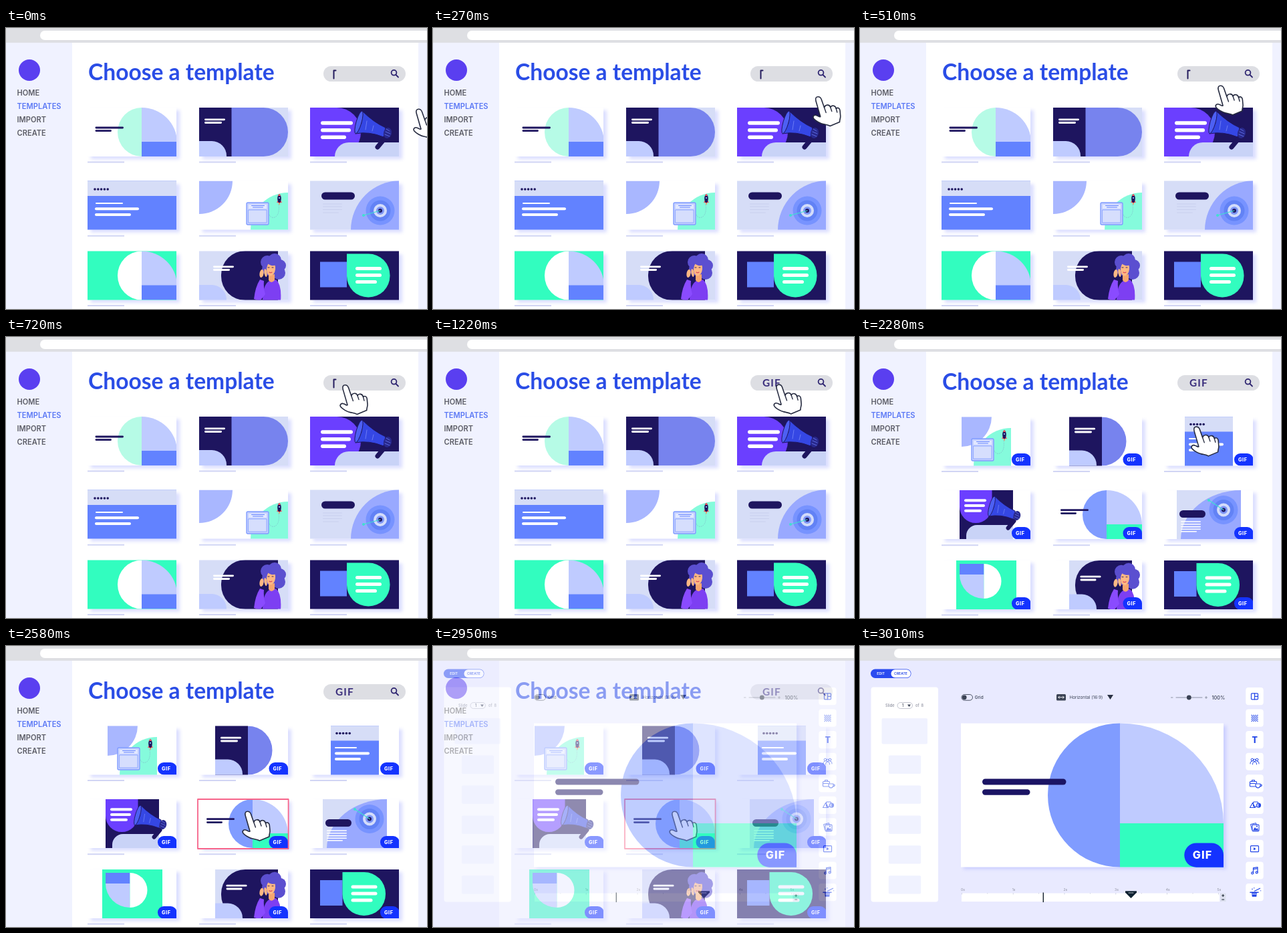
Animation of 630 by 420 pixels, one loop 4.84 s. Source, as an HTML page with a canvas:

```html
<!DOCTYPE html>
<html lang="en">
<head>
<meta charset="utf-8">
<title>Choose a template</title>
<style>
html, body { margin: 0; width: 100%; height: 100%; overflow: hidden; background: #fff; }
canvas { display: block; }
</style>
</head>
<body>
<canvas id="stage" width="630" height="420"></canvas>
<script>
const W = 630, H = 420, LOOP = 4840, STEP = 30;
const NAVY = '#1e155f', BLUE = '#6282ff', LILAC = '#bfcbff', PALE = '#d6ddf7',
  MINT = '#32fdbf', PERI = '#7783ee', PURPLE = '#6b3fff', SKY = '#809cff',
  INK = '#2346e8', WHITE = '#fff', PANEL = '#f0f2ff';
const screen = document.getElementById('stage').getContext('2d');
let g = screen;

// ---- drawing helpers ----
function rect(c, x, y, w, h) { g.fillStyle = c; g.fillRect(x, y, w, h); }

function round(c, x, y, w, h, r) {
  g.fillStyle = c; g.beginPath(); g.roundRect(x, y, w, h, r); g.fill();
}

function frame(c, lw, x, y, w, h, r = 0) {
  g.strokeStyle = c; g.lineWidth = lw;
  g.beginPath(); g.roundRect(x, y, w, h, r); g.stroke();
}

function oval(c, x, y, rx, ry = rx, rot = 0) {
  g.fillStyle = c; g.beginPath(); g.ellipse(x, y, rx, ry, rot, 0, 7); g.fill();
}

// Sector starting at quadrant q (0 = lower right, clockwise), n quadrants wide
function pie(c, x, y, rx, ry, q, n = 1) {
  g.fillStyle = c; g.beginPath(); g.moveTo(x, y);
  g.ellipse(x, y, rx, ry, 0, q * Math.PI / 2, (q + n) * Math.PI / 2); g.fill();
}

function bar(c, x1, x2, y, w) { round(c, x1, y - w / 2, x2 - x1, w, w / 2); }

function fill(c, d) { g.fillStyle = c; g.fill(new Path2D(d)); }

function stroke(c, lw, d) {
  g.strokeStyle = c; g.lineWidth = lw; g.lineCap = g.lineJoin = 'round';
  g.stroke(new Path2D(d));
}

function text(s, x, y, font, c, gap = 0) {
  g.font = font; g.fillStyle = c; g.letterSpacing = gap + 'px'; g.fillText(s, x, y);
}

const inter = (weight, size) => `${weight} ${size}px Inter, sans-serif`;
const lato = size => `bold ${size}px Lato, sans-serif`;

function at(x, y, s, paint) {
  g.save(); g.translate(x, y); g.scale(s, s); paint(); g.restore();
}

function shadow(dx, dy, blur) {
  g.shadowColor = 'rgba(90,105,255,.22)';
  g.shadowOffsetX = dx; g.shadowOffsetY = dy; g.shadowBlur = blur;
}

function bake(paint) {
  const c = document.createElement('canvas');
  c.width = W; c.height = H;
  g = c.getContext('2d');
  paint();
  g = screen;
  return c;
}

// ---- small illustrations ----
function megaphone(x, y, s) {
  at(x, y, s, () => {
    stroke(NAVY, 7, 'M38 25L28 37');
    fill('#3547e4', 'M5-17Q22 0 40 8L37 22Q15 13-5 17Z');
    stroke(NAVY, 1, 'M5-17Q22 0 40 8L37 22Q15 13-5 17');
    oval('#28288c', 43, 16, 6, 8, .25);
    stroke('#6b7bf5', .8, 'M41 10L46 13M40 14L47 17M39 18L46 21');
    oval('#4d60f3', 0, 0, 4, 17.5, .28);
    g.strokeStyle = NAVY; g.lineWidth = 1; g.stroke();
    stroke('#6b7bf5', 1, 'M12-2L10 11M22 5L20 13');
  });
}

function appWindow(x, y) {
  round('#c5d0ff', x, y, 33, 33, 2);
  frame(SKY, 1.4, x, y, 33, 33, 2);
  rect('#e2e8ff', x + 3, y + 3, 27, 6);
  bar(BLUE, x + 7, x + 27, y + 4.5, 1);
  bar(BLUE, x + 9, x + 25, y + 7, 1);
  rect('#d6defd', x + 3, y + 11, 27, 19);
  frame(SKY, .8, x + 3, y + 11, 27, 19);
}

function rocket(x, y) {
  g.setLineDash([1, 2]);
  stroke('#7fb8c8', .7, `M${x - 1} ${y + 9}C${x + 2} ${y + 30} ${x - 12} ${y + 32} ${x - 15} ${y + 24}`);
  g.setLineDash([]);
  fill('#f2545b', `M${x - 4} ${y + 6}l4-7l4 7z`);
  oval(NAVY, x, y, 2.8, 6.5);
  fill('#f2545b', `M${x - 2} ${y - 4}Q${x} ${y - 10} ${x + 2} ${y - 4}Z`);
  oval('#9fd8ff', x, y - 1, 1.1);
  fill('#ff8a5c', `M${x - 1.5} ${y + 6}h3l-1.5 4z`);
}

function target(x, y, tx, ty) {
  [[21.5, '#7793ff'], [15.5, '#6282f5'], [10, '#d3dcfb'], [6, '#7d95f5'], [3, NAVY]]
    .forEach(([r, c]) => oval(c, x, y, r));
  stroke('#3fe0d0', 1.2, `M${tx} ${ty}L${x} ${y}`);
  oval('#3fe0d0', tx, ty, 2);
}

function woman(dy) {
  at(0, dy, 1, () => {
    [[391, 350, 10], [402, 347, 10], [410, 355, 9], [408, 366, 10], [393, 360, 10], [402, 357, 13]]
      .forEach(([x, y, r]) => oval('#5b4fd0', x, y, r));
    fill('#7d3ff2', 'M384 408Q384 384 394 378L404 376Q413 384 411 408Z');
    fill('#8a4bff', 'M371 405Q373 387 380 376L386 378Q385 390 388 398L380 408Z');
    fill('#f7a66f', 'M393 370L402 368L402 377Q397 383 393 377Z');
    oval('#ffb883', 396.5, 360, 6.5, 10.5, .1);
    oval('#ffb883', 382.5, 367, 3, 6, .15);
    oval('#ffb883', 388.5, 366, 2, 6, -.15);
    stroke(NAVY, .9, 'M392 358h2M398 358h2');
    stroke('#d8465c', 1.1, 'M394 365q2 1.5 4 0');
    oval('#5b4fd0', 398, 350, 8, 5, .2);
  });
}

// ---- pieces shared by thumbnails ----
function card(x, y, paint) {
  g.save();
  shadow(5, 4, 5); rect(WHITE, x, y, 133, 73);
  g.restore();
  g.save();
  g.beginPath(); g.rect(x, y, 133, 73); g.clip();
  paint();
  g.restore();
}

// Split disc: left half, upper right quadrant, lower right block
function splitDisc(x, y, left, low) {
  pie(left, x, y + 36.5, 36, 36.5, 1, 2);
  pie(LILAC, x, y + 52, 53, 52, 3);
  rect(low, x, y + 51, 53, 22);
}

function lines(c, w, x, list) { list.forEach(([len, y]) => bar(c, x, x + len, y, w)); }

function dots(x, y) { for (let i = 0; i < 5; i++) oval(NAVY, x + i * 4.8, y, 1.8); }

function corner(x, y) { round(LILAC, x, y, 41, 24, [0, 22, 0, 0]); }

function leaf(x, y, w) {
  rect(BLUE, 470, y + 12, x - 470, 38);
  round(MINT, x, y, w, 65, [0, 32, 32, 32]);
  lines(WHITE, 5, x + 13, [[39, y + 22], [39, y + 32], [32, y + 42]]);
}

function badge(x, y) {
  round('#1433ff', x, y, 28.5, 18.5, [9, 9, 0, 9]);
  text('GIF', x + 6, y + 12.2, inter(800, 7.3), WHITE, .6);
}

// ---- gallery screens ----
function topBar() {
  rect('#dedfe3', 0, 0, W, 22);
  round(WHITE, 51, 4, 620, 14, 7);
}

function gallery(dy) {
  rect(WHITE, 0, 0, W, H);
  rect(PANEL, 0, 22, 99, 398);
  rect(PANEL, 617, 22, 13, 398);
  topBar();
  oval('#5a3ff0', 35, 63, 16);
  ['HOME', 'TEMPLATES', 'IMPORT', 'CREATE'].forEach((s, i) =>
    text(s, 16.5, 101 + i * 20, inter(600, 11.1), i == 1 ? '#5b78f5' : '#5c5d66'));
  text('Choose a template', 123, 78 + dy, lato(33.6), '#2a4de6');
  round('#dddee3', 475, 57, 123, 23, 11.5);
  stroke('#2d2470', 1.8, 'M583.5 70L587 73.5');
  g.beginPath(); g.arc(580.5, 66.8, 3.9, 0, 7); g.stroke();
  for (const x of [122, 289, 455])
    for (const y of [199.5, 309.7, 414]) rect('#d2d6f4', x, y + dy / 2, 55, 2);
}

function allTemplates() {
  gallery(0);
  card(122, 119, () => {
    splitDisc(203, 119, '#b6fbe6', BLUE);
    lines(NAVY, 2.8, 133.5, [[42.5, 149], [24.5, 153.6]]);
  });
  card(289, 119, () => {
    rect(PALE, 289, 119, 133, 73);
    round(PERI, 337, 119, 85, 73, [0, 36.5, 36.5, 0]);
    rect(NAVY, 289, 119, 48.5, 73);
    corner(289, 169);
    lines(WHITE, 2.8, 297, [[31, 136.8], [26, 141.5]]);
  });
  card(455, 119, () => {
    rect(NAVY, 455, 119, 133, 73);
    round(PURPLE, 445, 119, 86, 73, [0, 36, 36, 0]);
    round('#c9d3f7', 492, 171, 110, 30, [21, 0, 0, 0]);
    lines(WHITE, 5.4, 471, [[48, 142], [45, 152.7], [38, 163.3]]);
    megaphone(528, 141, 1);
  });
  card(122, 228.5, () => {
    rect(BLUE, 122, 228, 133, 74);
    rect(PALE, 122, 228, 133, 23);
    dots(133, 241);
    bar(WHITE, 134, 175, 262, 2);
    lines(WHITE, 4, 133, [[66, 270.3], [54, 279]]);
  });
  card(289, 228.5, () => {
    pie('#a9b7ff', 289, 228.5, 50, 49.5, 0);
    pie('#85fbdc', 422, 302, 56, 56, 2);
    appWindow(360, 261);
    rocket(409, 255);
  });
  card(455, 228.5, () => {
    rect(PALE, 455, 228, 133, 74);
    pie('#99a9ff', 590, 302, 74, 74, 2);
    target(560, 273, 535, 280);
    bar(NAVY, 472, 522, 251, 11);
    lines('#c9d0ee', 1, 474, [[29, 263], [29, 267], [29, 271.5], [24, 276]]);
  });
  card(122, 333.5, () => {
    rect(MINT, 122, 333, 133, 74);
    splitDisc(203, 333.5, WHITE, BLUE);
  });
  card(289, 333.5, () => {
    rect(PALE, 289, 333, 133, 74);
    round(NAVY, 322, 333, 85, 74, [36, 0, 0, 36]);
    corner(289, 384);
    lines(WHITE, 2.8, 310, [[31, 356.8], [25, 361.5]]);
    woman(0);
  });
  card(455, 333.5, () => {
    rect(NAVY, 455, 333, 133, 74);
    leaf(510, 337.5, 64.5);
  });
}

function gifTemplates() {
  gallery(1);
  card(122, 119.5, () => {
    pie('#a9b7ff', 152, 119, 45, 45, 0);
    pie('#85fbdc', 226, 193, 56, 57, 2);
    appWindow(167, 152);
    rocket(216, 146);
    badge(227, 174);
  });
  card(289, 119.5, () => {
    rect(NAVY, 313, 119, 49, 74);
    pie(PERI, 362, 156, 36.5, 36.5, 3, 2);
    corner(313, 169.5);
    lines(WHITE, 2.8, 321, [[31, 137.2], [26, 142]]);
    badge(393.5, 174);
  });
  card(455, 119.5, () => {
    rect(BLUE, 486, 119, 72, 74);
    rect(PALE, 486, 119, 72, 22.5);
    dots(495, 130.5);
    bar(WHITE, 492, 525, 152, 2);
    lines(WHITE, 4, 492, [[52, 160.5], [39, 169]]);
    badge(560, 174);
  });
  card(122, 229, () => {
    rect(NAVY, 149, 229, 80, 74);
    round(PURPLE, 149, 220, 48.5, 58, [0, 0, 25, 25]);
    round('#c9d3f7', 159, 281, 70, 22, [16, 0, 0, 0]);
    lines(WHITE, 4, 156, [[33, 244.3], [31, 252], [26, 259.8]]);
    megaphone(197, 253, .88);
    badge(227, 284);
  });
  card(289, 229, () => {
    splitDisc(369, 229, SKY, MINT);
    lines(NAVY, 2.8, 300, [[42, 258.7], [24, 263.6]]);
    badge(393.5, 284);
  });
  card(455, 229, () => {
    rect(PALE, 474, 229, 96, 74);
    g.save();
    g.beginPath(); g.rect(474, 229, 96, 74); g.clip();
    pie('#99a9ff', 570, 303, 90, 74, 2);
    g.restore();
    target(544, 258.5, 522, 244);
    bar(NAVY, 478, 517, 264.5, 11);
    lines(WHITE, 1.6, 480, [[30, 276], [30, 279.8], [30, 283.6], [30, 287.2], [24, 290.8]]);
    badge(560, 284);
  });
  card(122, 334, () => {
    rect(MINT, 144, 334, 90, 74);
    rect(BLUE, 149, 339, 36.5, 16);
    pie(LILAC, 185.5, 355, 36.5, 36, 1);
    pie(WHITE, 185.5, 365, 26, 26, 3, 2);
    badge(227, 389);
  });
  card(289, 334, () => {
    rect(PALE, 313, 334, 94, 74);
    round(NAVY, 322, 334, 85, 74, [36, 0, 0, 36]);
    corner(313, 384.5);
    lines(WHITE, 2.8, 329.5, [[31, 358.2], [24, 363]]);
    woman(.7);
    badge(393.5, 389);
  });
  card(455, 334, () => {
    rect(NAVY, 455, 334, 133, 74);
    leaf(503.5, 338, 64.5);
    badge(560, 389);
  });
}

// ---- editor screen ----
// Tool icons, centred on 0,0
const icons = [
  () => { frame(INK, 1.2, -5, -4.5, 10, 9, 1); stroke(INK, 1.2, 'M0-4.5V4.5M0 0H5'); },
  () => {
    for (let i = 0; i < 49; i++)
      if (i % 2 == 0) rect(INK, -5 + i % 7 * 1.45, -5 + (i / 7 | 0) * 1.45, 1.4, 1.4);
  },
  () => text('T', -4, 4.6, inter(800, 12.5), INK),
  () => {
    stroke(INK, 1, 'M-3 4q0-4 3-4t3 4M-6.5 3q0-4 3-4M6.5 3q0-4-3-4');
    for (const [x, y] of [[0, -2], [-3.6, -3], [3.6, -3]]) {
      g.beginPath(); g.arc(x, y, 1.8, 0, 7); g.stroke();
    }
  },
  () => {
    frame(INK, 1.1, -7, -3, 10, 7.5, 1);
    stroke(INK, 1.1, 'M-4-3v-2h4v2M-7 0H2');
    fill(WHITE, 'M1 0h8v4q-1 3-4 3t-4-3z');
    stroke(INK, 1.1, 'M1.5 .5h7v3q-1 3-3.5 3t-3.5-3zM8.5 1.5q3 0 2 2q-1 1-2 1');
  },
  () => {
    stroke(INK, 1.1, 'M-7 3.5l4-7l4 7z');
    frame(INK, 1.1, -2, -5, 7, 7, 1);
    oval(INK, 6, 0, 3.6);
    pie('#b9c5ff', 6, 0, 2.6, 2.6, 1, 2);
  },
  () => {
    stroke(INK, 1, 'M-4 4l-2-8l8-2l.5 2');
    frame(INK, 1.1, -3.5, -3.5, 10, 9.5, 1);
    fill(INK, 'M-2.5 5l3-4.5l2 2.5l1.5-1.5l1.8 3.5z');
    oval(INK, 3.5, -1, 1.1);
  },
  () => { frame(INK, 1.2, -6, -4.5, 12, 9, 1); fill(INK, 'M-1.5-2.2L2.2 0L-1.5 2.2z'); },
  () => {
    stroke(INK, 1.2, 'M-2 3.5V-4L4.5-5V2.5M-2-2L4.5-3');
    for (const [x, y] of [[-3.3, 3.7], [3.2, 2.7]]) {
      g.beginPath(); g.arc(x, y, 1.5, 0, 7); g.stroke();
    }
  },
  () => {
    fill(INK, 'M-4.5 0h8l-.8 6.5h-6.4z');
    stroke(INK, 1.6, 'M-6.5 0H5.5');
    stroke(INK, 1.2, 'M0-2L8-6M-4-5h1M-1-6.5h.5M9-2.5h.2');
    rect(WHITE, -4, 2, 7, 1);
  }
];

function editor() {
  const dark = '#3a4254', soft = '#8a8d9c';
  rect('#e9eaff', 0, 0, W, H);
  topBar();

  round('#2b4bf0', 16, 34.5, 60.5, 13.5, 6.75);
  round(WHITE, 46.5, 35.3, 29.3, 12, 6);
  text('EDIT', 25.3, 43.2, inter(600, 5.2), WHITE);
  text('CREATE', 51, 43.2, inter(600, 5.1), INK);

  round(WHITE, 16.5, 61.5, 100.5, 321, 4);
  text('Slide', 38, 91, inter(500, 5.6), soft, .1);
  frame('#a9acba', .7, 56, 84.5, 22.5, 9, 4.5);
  text('1', 63, 91, inter(500, 5.6), dark);
  fill(dark, 'M71 87.6h5l-2.5 3.4z');
  text('of  8', 83, 91, inter(500, 5.6), soft);
  round(PANEL, 32.5, 108, 68.5, 38.5, 2);
  for (let i = 0; i < 5; i++) round(PANEL, 42.8, 163.6 + i * 44.9, 48.4, 27.3, 2);

  frame(dark, .9, 152, 72.5, 16.5, 8.7, 4.35);
  oval(dark, 156.2, 76.8, 3.4);
  text('Grid', 171.8, 79.3, inter(500, 6.4), dark);
  round(dark, 294, 72, 14, 9.5, 1.5);
  stroke(WHITE, .9, 'M297 76.7h8M298.5 75l-1.7 1.7l1.7 1.7M303.5 75l1.7 1.7l-1.7 1.7');
  text('Horizontal (16:9)', 313.5, 79.3, inter(400, 6.4), dark);
  fill('#2a3144', 'M370 73h9l-4.5 7z');
  stroke('#8d92a4', 1, 'M465.5 77h2.5M473 77h39M516.5 77h3M518 75.5v3');
  oval(dark, 492.3, 77, 3.4);
  text('100%', 526.5, 79.7, inter(500, 7.3), dark);

  g.save();
  shadow(4, 3, 5); rect(WHITE, 151, 115.5, 393, 215);
  g.restore();
  pie(SKY, 389, 223, 108, 107.5, 1, 2);
  pie(LILAC, 389, 265, 155, 149.5, 3);
  rect(MINT, 389, 265, 155, 65.5);
  bar('#1b1464', 183, 308.5, 203, 9);
  bar('#1b1464', 183, 254.5, 218.5, 8.4);
  round('#1433ff', 485.3, 294.5, 58.7, 36.2, [18, 18, 0, 18]);
  text('GIF', 497.7, 318.3, inter(800, 16.2), WHITE, 1.1);

  rect(WHITE, 152, 369.5, 386, 12.5);
  for (let i = 0; i < 6; i++) text(i + 's', 151 + i * 76.7, 366, inter(400, 5), soft);
  for (let i = 0; i < 11; i++) rect('#c9cce0', 152 + i * 38.4, 369, .8, i % 2 ? 1.5 : 2.5);
  rect('#14202e', 273.6, 368.5, 1.4, 14.5);
  fill('#0f2232', 'M397 366.3h17v2.2l-8.5 8.5l-8.5-8.5z');
  for (let i = 0; i < 3; i++) oval(WHITE, 402.9 + i * 2.6, 369, .8);
  rect('#dcdfee', 539, 369.5, 8.5, 12.5);
  stroke('#14202e', 1, 'M541.7 373h3M543.2 371.5v3M541.7 379h3');

  icons.forEach((icon, i) => {
    const y = 62 + i * 32.55;
    round(WHITE, 577.3, y, 26.4, 26.2, 4);
    at(590.5, y + 13.3, 1, icon);
  });
}

// ---- pointer ----
const hand = 'M11-2L4.2-25.5C3-30 5-31.8 7.4-31.8C9.8-31.8 11.4-30.5 12.4-28L16.8-15.5' +
  'C18-20 24.5-21 26-16C28-19.8 33.5-18.8 34.5-14C37-16.5 40-14.5 40.3-11L41-3' +
  'C41.3 0 39.5 3 39.8 6L25.5 12C22 10 19 10 15 9C10 8 3.5 4 1 1C-1.5-2.5 2-5.5 6-3.5C8-2.7 9.5-1 11-2Z';

function pointer([x, y]) {
  at(x, y, 1, () => {
    fill(WHITE, hand);
    stroke('#262b40', 1.6, hand);
    stroke('#262b40', 1.4, 'M16.8-15.5L19.4-8M26-16L28-10M34.5-14L36-8.5');
  });
}

// ---- timeline ----
const stops = [[610, 153], [500, 103.6], [581, 98], [354, 279]];

// Progress in n even ticks from time a
function ticks(t, a, n) {
  return Math.min(n, Math.max(0, Math.floor((t - a) / STEP))) / n;
}

function pointerAt(t) {
  const [i, k] = t < 1190 ? [0, ticks(t, 0, 24)]
    : t < 2100 ? [1, ticks(t, 1190, 8)] : [2, ticks(t, 2100, 16)];
  return stops[i].map((v, j) => v + (stops[i + 1][j] - v) * k);
}

const before = bake(allTemplates), after = bake(gifTemplates), work = bake(editor);

function draw(t) {
  const fade = ticks(t, 2890, 4);
  if (fade < 1) {
    g.drawImage(t < 1560 ? before : after, 0, 0);
    if (t < 950) stroke('#231a5c', 2, 'M490.5 75.5V63.5H493.5');
    else text('GIF', 493, 74.3, lato(15.4), '#3a2e7c', 1.1);
    if (t >= 2580) frame('#f7648a', 1.8, 287, 229, 135.6, 74);
    pointer(pointerAt(t));
  }
  g.globalAlpha = fade;
  g.drawImage(work, 0, 0);
  g.globalAlpha = 1;
}

const start = performance.now();
function tick(now) {
  draw(Math.max(0, now - start) % LOOP);
  requestAnimationFrame(tick);
}
draw(0);
requestAnimationFrame(tick);
</script>
</body>
</html>
```
